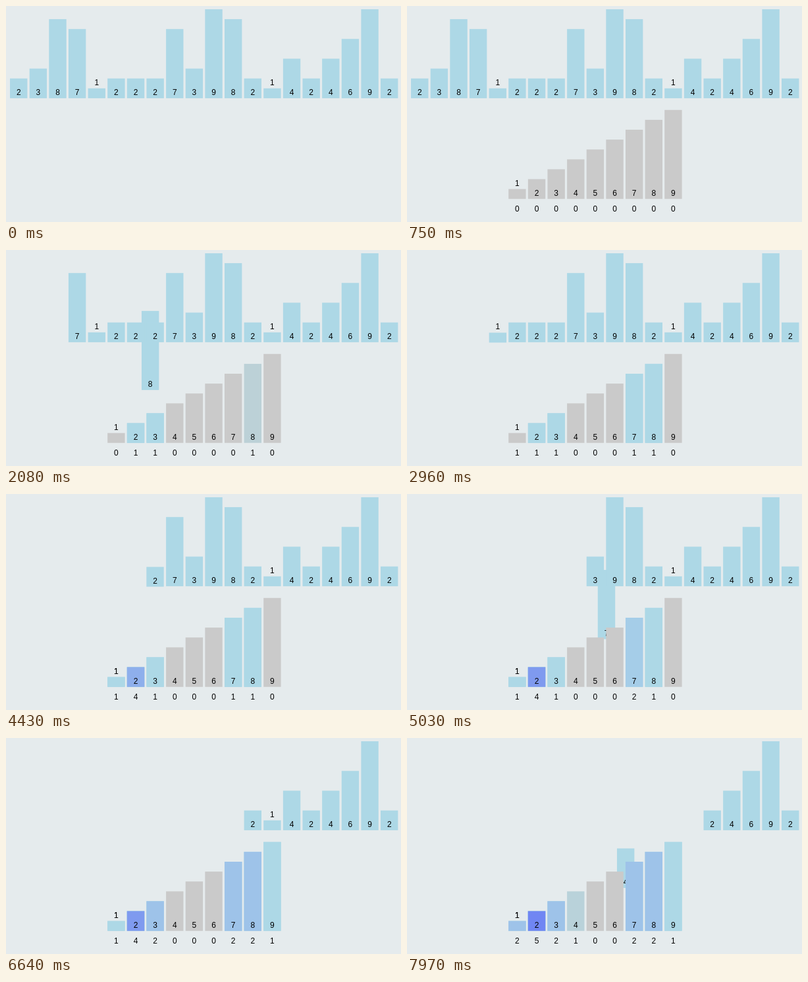
Write an HTML page with a canvas that moves like this. It is 600x330 px and loops after 8 s.

```html
<!DOCTYPE html>
<html lang="en">
<head>
<meta charset="utf-8">
<title>Counting sort</title>
<style>
  html, body { margin: 0; width: 100%; height: 100%; overflow: hidden; background: #e5ebed; }
  canvas { display: block; }
</style>
</head>
<body>
<canvas id="stage" width="600" height="330"></canvas>
<script>
const ctx = document.getElementById('stage').getContext('2d');

const LOOP = 8000;
const STEP = 147.3;          // the picture is refreshed at this interval
const STEP_START = 598;
const POSE_LAG = 8;

const FIRST_MOVE = 978, PERIOD = 490.3, MOVE = 245;
const VALUES = [2, 3, 8, 7, 1, 2, 2, 2, 7, 3, 9, 8, 2, 1, 4, 2, 4, 6, 9, 2];

const LEFT = 6.05, PITCH = 29.63, WIDTH = 26.4, UNIT = 15.1;
const TOP_BASE = 140.9, BUCKET_BASE = 294.7, COUNT_BASELINE = 314;

const GRAY = [202, 202, 202], LIGHT = [173, 216, 230], DEEP = [51, 51, 255];

const slotX = i => LEFT + i * PITCH;
const bucketX = value => slotX(value + 4);
const lerp = (a, b, p) => a + (b - a) * p;
const mix = (a, b, p) => a.map((v, i) => lerp(v, b[i], p));
const rgb = c => `rgb(${c.map(Math.round)})`;
const bucketColor = n => n ? mix(LIGHT, DEEP, (n - 1) / 8) : GRAY;

function easeCubic(t) {
  t = Math.min(1, Math.max(0, t));
  return t < 0.5 ? 4 * t ** 3 : 1 - 4 * (1 - t) ** 3;
}

// Progress of move i; index -1 is the appearance of the buckets.
const progress = (i, time) => easeCubic((time - FIRST_MOVE - i * PERIOD) / MOVE);

function label(text, x, baseline) {
  ctx.fillStyle = '#000';
  ctx.fillText(text, x + WIDTH / 2, baseline);
}

function bar(value, x, base, color) {
  const height = value * UNIT;
  ctx.fillStyle = rgb(color);
  ctx.fillRect(x, base - height, WIDTH, height);
  label(value, x, base - (value === 1 ? 20 : 5));
}

function draw(time) {
  ctx.globalAlpha = 1;
  ctx.fillStyle = '#e5ebed';
  ctx.fillRect(0, 0, 600, 330);
  ctx.font = '12px "Liberation Sans", Arial, sans-serif';
  ctx.textAlign = 'center';

  const counts = Array(10).fill(0);
  const colors = Array(10).fill(GRAY);
  VALUES.forEach((value, i) => {
    const p = progress(i, time);
    if (p > 0) {
      const n = ++counts[value];
      colors[value] = mix(bucketColor(n - 1), bucketColor(n), p);
    }
    bar(value, lerp(slotX(i), bucketX(value), p), lerp(TOP_BASE, BUCKET_BASE, p), LIGHT);
  });

  ctx.globalAlpha = progress(-1, time);
  for (let value = 1; value <= 9; value++) {
    bar(value, bucketX(value), BUCKET_BASE, colors[value]);
    label(counts[value], bucketX(value), COUNT_BASELINE);
  }
}

const start = performance.now();
function frame() {
  const elapsed = (performance.now() - start) % LOOP;
  const step = Math.floor((elapsed - STEP_START) / STEP);
  draw(STEP_START + POSE_LAG + step * STEP);
  requestAnimationFrame(frame);
}
frame();
</script>
</body>
</html>
```
